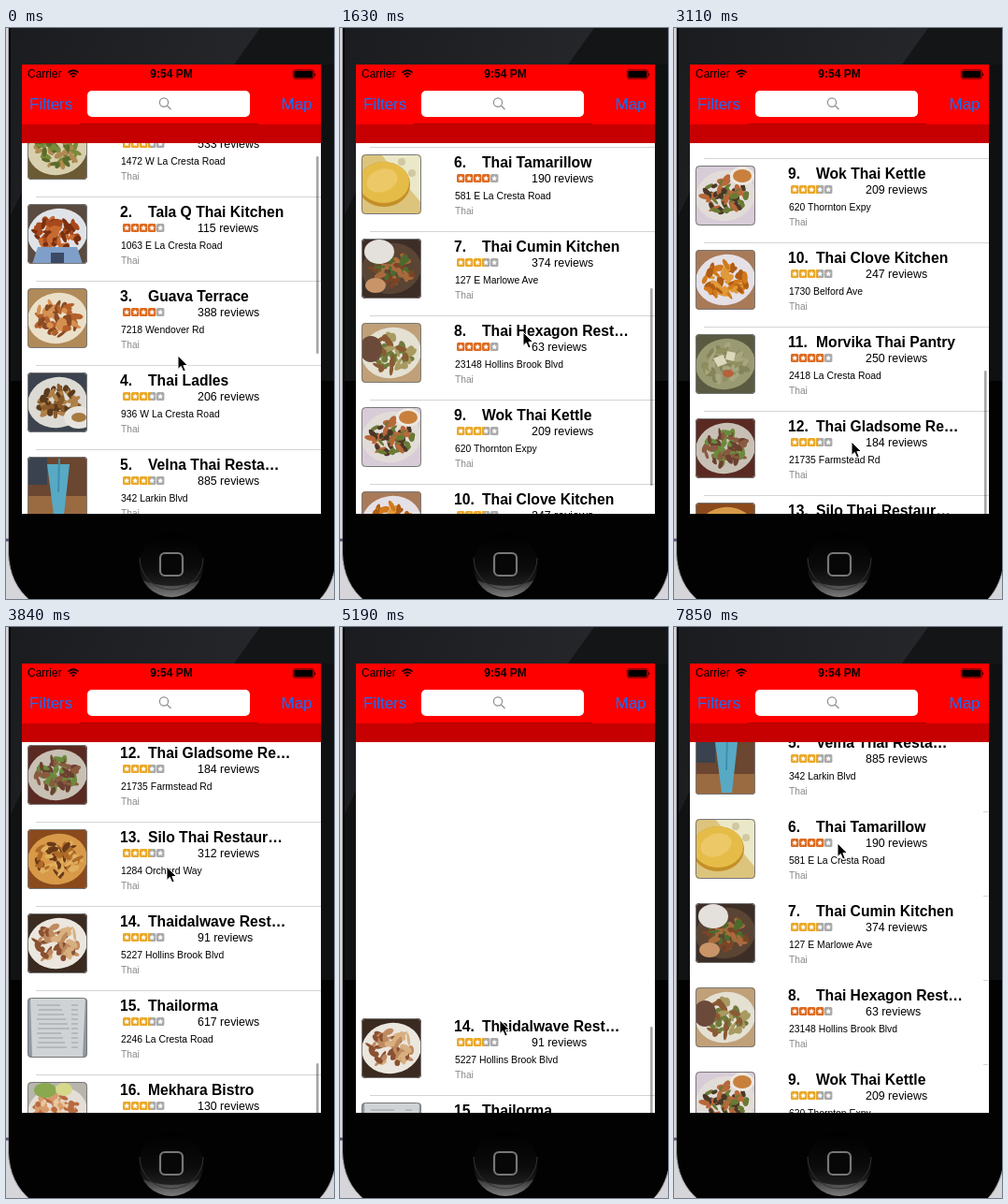
Recreate the animation shown at these times as an HTML page. Size 351 by 610 pixels, loop 7990 ms.

```html
<!DOCTYPE html>
<html lang="en">
<head>
<meta charset="utf-8">
<title>Restaurant list</title>
<style>
  html, body { margin: 0; width: 100%; height: 100%; overflow: hidden; background: #000; }
  svg { display: block; font-family: "Liberation Sans", Arial, sans-serif; }
  .title { font-size: 15.7px; font-weight: bold; }
  .count { font-size: 12.4px; }
  .addr { font-size: 10.4px; }
  .kind { font-size: 10.2px; fill: #8a8a8a; }
  .link { font-size: 17px; fill: #1670f5; }
  .status { font-size: 12px; }
</style>
</head>
<body>
<svg width="351" height="610" viewBox="0 0 351 610">
  <defs>
    <clipPath id="view"><rect x="17" y="123" width="320" height="396"/></clipPath>
    <clipPath id="round"><rect x="23" y="-8" width="64" height="64" rx="4"/></clipPath>
    <clipPath id="button"><circle cx="177" cy="573.500" r="34.500"/></clipPath>
    <linearGradient id="gloss" x2="1" y2="0.250">
      <stop offset="0" stop-color="#1b1c1f"/><stop offset="1" stop-color="#292a2e"/>
    </linearGradient>
    <linearGradient id="dome" x2="0" y2="1">
      <stop offset="0" stop-color="#000"/><stop offset="0.550" stop-color="#0b0b0b"/><stop offset="1" stop-color="#2c2c2c"/>
    </linearGradient>
    <linearGradient id="rim" x2="0" y2="1">
      <stop offset="0" stop-color="#2c2c2c"/><stop offset="1" stop-color="#858585"/>
    </linearGradient>
    <g id="star">
      <rect width="8.400" height="9" rx="1.500"/>
      <path d="M4.200 1.600l.9 1.900 2 .3-1.500 1.400.4 2.100-1.800-1-1.800 1 .4-2.100L1.300 3.800l2-.3z" fill="#fff"/>
    </g>
  </defs>

  <g id="phone">
    <rect width="351" height="610" fill="#d6d6da"/>
    <path d="M2.500 -5V560C3 584 12 600 26 612H334C343 604 349 592 352 578V-5Z" fill="#020202" stroke="#a4a4aa"/>
    <path d="M0 547h3" stroke="#55506a" stroke-width="3"/>
    <path d="M5 0H351V39H17V377H5Z" fill="url(#gloss)"/>
    <path d="M272 0H351V39H244Z" fill="#141517"/>
    <path d="M5 200L17 175V377H5Z" fill="#111214"/>
    <path d="M337 39H351V377H337Z" fill="#0f1012"/>
    <circle cx="177" cy="573.500" r="34.500" fill="url(#dome)"/>
    <path d="M142 588Q177 604 212 588V610H142Z" fill="url(#rim)" clip-path="url(#button)"/>
    <path d="M143 566A34 34 0 0 0 211 566" fill="none" stroke="#333"/>
    <rect x="165" y="561" width="24" height="24" rx="5" fill="#070707" stroke="#777" stroke-width="2.200"/>
  </g>

  <rect x="17" y="123" width="320" height="396" fill="#fff"/>
  <g clip-path="url(#view)">
    <g id="list"></g>
    <rect id="bar" x="332" width="2.600" height="211" rx="1.300" fill="#000" fill-opacity="0.350"/>
  </g>

  <rect x="17" y="39" width="320" height="64" fill="#f00"/>
  <rect x="17" y="103" width="320" height="20" fill="#c60000"/>
  <path d="M79 102.500H270" stroke="#b00000"/>
  <text class="status" x="23" y="53">Carrier</text>
  <g fill="none" stroke="#000" stroke-width="1.700">
    <path d="M66.500 47.700Q72 42.800 77.500 47.700M68.600 49.900Q72 46.900 75.400 49.900"/>
    <path d="M72 53L70.600 51.500Q72 50.500 73.400 51.500Z" fill="#000" stroke-width="0.800"/>
  </g>
  <text class="status" x="177" y="53" text-anchor="middle" font-weight="bold">9:54 PM</text>
  <rect x="307.300" y="44.800" width="22" height="9.400" rx="1.800" fill="none" stroke="#000" stroke-width="0.600"/>
  <rect x="308.300" y="45.800" width="20" height="7.400" rx="1"/>
  <path d="M330.300 47.500q1.800 2 0 4z"/>
  <text class="link" x="25" y="87">Filters</text>
  <text class="link" x="294.500" y="87">Map</text>
  <rect x="87" y="67" width="174" height="28" rx="5" fill="#fff"/>
  <g fill="none" stroke="#8e8e93" stroke-width="1.200">
    <circle cx="169" cy="79.500" r="4.600"/><path d="M172.400 83L176.500 87"/>
  </g>
  <path id="cursor" d="M0 0V14.500L3.300 11.400L5.700 17L8.200 16L5.900 10.500H10.500Z" stroke="#fff"/>
</svg>
<script>
const $ = id => document.getElementById(id);
const PITCH = 90, FIRST = 106, LOOP = 7990, STEPS = 54;

// name, reviews, street, full stars
const rows = [
  ['Lotus Nook Thai', 533, '1472 W La Cresta Road', 3],
  ['Tala Q Thai Kitchen', 115, '1063 E La Cresta Road', 4],
  ['Guava Terrace', 388, '7218 Wendover Rd', 4],
  ['Thai Ladles', 206, '936 W La Cresta Road', 3],
  ['Velna Thai Resta…', 885, '342 Larkin Blvd', 3],
  ['Thai Tamarillow', 190, '581 E La Cresta Road', 4],
  ['Thai Cumin Kitchen', 374, '127 E Marlowe Ave', 3],
  ['Thai Hexagon Rest…', 63, '23148 Hollins Brook Blvd', 4],
  ['Wok Thai Kettle', 209, '620 Thornton Expy', 3],
  ['Thai Clove Kitchen', 247, '1730 Belford Ave', 3],
  ['Morvika Thai Pantry', 250, '2418 La Cresta Road', 4],
  ['Thai Gladsome Re…', 184, '21735 Farmstead Rd', 3],
  ['Silo Thai Restaur…', 312, '1284 Orchard Way', 3],
  ['Thaidalwave Rest…', 91, '5227 Hollins Brook Blvd', 3],
  ['Thailorma', 617, '2246 La Cresta Road', 3],
  ['Mekhara Bistro', 130, '640 N Dunstorff Ave', 3],
  ['Oluvin Thai Kitchen', 809, '251 Alder St', 3],
  ['Nuvo Fine Thai Ki…', 726, '418 Quarry Ave', 4]
];

// backdrop, dish, then food tones
const dishes = [
  '#6b5a34 #d8cfae #7a8a3a #b08a50 #5a6a2a', '#5a4a40 #dfe3e8 #a8481c #c86a30 #7a3010',
  '#b08a58 #eadfc8 #b5602a #d59050 #8a4a24', '#3c434e #dcdad4 #8a5a2a #b08048 #5a3a1c',
  '#6b4630 #58a9c4', '#ddc47c #e6bc48',
  '#3c2e26 #5a4434 #7a4426 #4d6a2c #a86a3c', '#c0a078 #e4e0d2 #6d7a3a #a89a60 #8a5a34',
  '#d8ccd8 #e2dcd8 #4a3828 #b8683a #6a7a34', '#a87a58 #e5e0e6 #d27a1c #e09a38 #b05c14',
  '#5a5a42 #9a9a72 #8f8f60 #a8a680 #84845a', '#5a2a22 #c8c0b4 #8a5a40 #6a8a3c #6a4030',
  '#8a4a1c #d89a48 #b06a28 #6a3a18 #e0b060', '#3a2a20 #ebe6de #c08a60 #d8b080 #8a5030',
  '#8e98a2 #cfd3d6', '#b8b4ae #e4ded6 #d89a6a #e8c8a0 #b86a40',
  '#a08870 #8a6a54 #3a2018 #5a3424 #2a1610', '#5a3020 #c8b0a0 #b04028 #4a7a30 #8a3020'
].map(s => s.split(' '));

const ellipse = (x, y, rx, ry, c, turn = 0) =>
  `<ellipse cx="${x}" cy="${y}" rx="${rx}" ry="${ry}" fill="${c}" transform="rotate(${turn} ${x} ${y})"/>`;
const shape = (d, c) => `<path d="${d}" fill="${c}"/>`;

function random(seed) {
  return () => (seed = seed * 16807 % 2147483647) / 2147483647;
}

// Flat details that set single dishes apart
const extras = {
  2: shape('M34 38H76L82 56H28Z', '#7f9fc8') + shape('M48 44h14v12H48Z', '#3c4a66'),
  4: ellipse(78, 40, 16, 12, '#e6e4de') + ellipse(78, 40, 8, 5, '#a87a40'),
  7: ellipse(42, 6, 16, 13, '#e4e0dc') + ellipse(38, 42, 11, 8, '#c89468'),
  8: ellipse(33, 20, 12, 14, '#6b4a3a'),
  9: ellipse(73, 3, 13, 10, '#eee8e0') + ellipse(73, 3, 10, 7, '#c8803c'),
  11: shape('M42 18l10-4 5 9-10 4zM57 10l9 2-2 9-9-2z', '#dcd8bc') + ellipse(58, 34, 6, 4, '#b8603a'),
  16: ellipse(42, 1, 12, 8, '#8aa850') + ellipse(62, 0, 9, 7, '#d6d88a'),
  17: ellipse(30, 4, 11, 11, '#d87428') + shape('M23 44L50 39 87 45V56H23Z', '#b4b4b4')
};

function photo(n) {
  const [bg, dish, ...foods] = dishes[n - 1];
  let out = `<rect x="23" y="-8" width="64" height="64" fill="${bg}"/>`;
  if (n === 5) {
    out += shape('M23 34H87V56H23Z', '#9a6a40') + shape('M23 -8H44V22H23Z', '#39424e')
      + shape('M44 0H68L62 54H51Z', dish) + shape('M56 -6H58L57 30H55Z', '#3f8fae');
  } else if (n === 6) {
    out += shape('M44 -8H87V44Z', '#eae8c8') + ellipse(66, 0, 4, 4, '#cfc8a0') + ellipse(77, 12, 4, 4, '#cfc8a0')
      + ellipse(47, 24, 28, 24, '#c48f28') + ellipse(47, 22, 27, 22, dish) + ellipse(45, 20, 17, 12, '#ecc866', -20);
  } else if (n === 15) {
    out += shape('M26 -8H85L82 56H28Z', dish);
    for (let y = 0; y < 50; y += 5)
      out += `<path d="M${33 + y % 3} ${y}H${58 + y * 7 % 11}M70 ${y}h7" stroke="#9a9ea2"/>`;
  } else {
    const rnd = random(n * 977 + 13);
    out += ellipse(55, 24, 32, 27, dish, -10);
    for (let i = 0; i < 60; i++) {
      const a = rnd() * 6.28, r = Math.sqrt(rnd());
      out += ellipse((55 + 23 * r * Math.cos(a)).toFixed(1), (24 + 18 * r * Math.sin(a)).toFixed(1),
        3 + rnd() * 4, 1.5 + rnd() * 2, foods[i % 3], rnd() * 180 | 0);
    }
  }
  return `<g clip-path="url(#round)">${out}${extras[n] || ''}</g>
    <rect x="23.500" y="-7.500" width="63" height="63" rx="4" fill="none" stroke="#777"/>`;
}

function stars(full) {
  const on = full === 4 ? '#dd6a20' : '#eaa828';
  let out = '';
  for (let i = 0; i < 5; i++) {
    const x = 125 + i * 9;
    out += `<use href="#star" x="${x}" y="13" fill="${i < full ? on : '#a9a9a9'}"/>`;
    if (full === 3 && i === 3) out += `<path d="M${x} 13h4v1.500h-2.500v6h2.500v1.500h-4z" fill="${on}"/>`;
  }
  return out;
}

$('list').innerHTML = rows.map(([name, count, street, full], i) => `<g>
  <path class="rule" d="M32 -15.500H337" stroke="#d4d4d6"/>
  ${photo(i + 1)}
  <text class="title" x="122" y="5.500">${i + 1}.</text><text class="title" x="152" y="5.500">${name}</text>
  ${stars(full)}
  <text class="count" x="205" y="22">${count} reviews</text>
  <text class="addr" x="123" y="40">${street}</text>
  <text class="kind" x="123" y="56">Thai</text></g>`).join('');
const cells = [...$('list').children];
const rules = [...document.querySelectorAll('.rule')];

// step, value...
const scroll = [[0, 0], [1, 30], [3, 120], [6, 231], [8, 262], [9, 280], [12, 480], [15, 568], [18, 604],
  [20, 640], [21, 671], [24, 900], [27, 1085], [29, 1138], [31, 1149], [32, 1096], [35, 850], [37, 640],
  [39, 428], [43, 366], [47, 345], [48, 343]];
const pointer = [[0, 184, 350], [4, 198, 247], [6, 198, 247], [9, 195, 430], [12, 197, 272], [15, 197, 272],
  [19, 190, 455], [21, 190, 442], [25, 172, 256], [31, 169, 256], [35, 171, 420], [39, 171, 400],
  [43, 171, 297], [47, 172, 270], [50, 172, 260], [51, 172, 260], [53, 175, 231]];
const fade = [[0, 1], [29, 1], [31, 0], [33, 1], [47, 1], [49, 0]];

function at(track, k, col = 1) {
  const i = track.findIndex(p => p[0] > k);
  if (i < 0) return track[track.length - 1][col];
  const a = track[i - 1], b = track[i];
  return a[col] + (b[col] - a[col]) * (k - a[0]) / (b[0] - a[0]);
}

// Scrolling back reveals empty space until the cells reload
function firstRow(k) {
  return k < 32 || k >= 48 ? 0 : k < 39 ? 13 : rows.length;
}

function draw(t) {
  const k = Math.min(STEPS - 1, Math.floor((t + 6) / LOOP * STEPS));
  const s = Math.round(at(scroll, k)), first = firstRow(k);
  const loaded = k >= 48, bare = k >= 14 && k <= 16;
  cells.forEach((cell, i) => {
    const y = FIRST + i * PITCH - s;
    cell.style.display = i >= first && y > 40 && y < 540 ? '' : 'none';
    cell.setAttribute('transform', `translate(0 ${y})`);
    rules[i].setAttribute('d', loaded ? 'M331 -15.500H336' : 'M32 -15.500H337');
    rules[i].style.display = bare || (first && i === first) ? 'none' : '';
  });
  $('bar').setAttribute('y', 137 + Math.round(s * 0.3415));
  $('bar').setAttribute('opacity', at(fade, k));
  $('cursor').setAttribute('transform',
    `translate(${Math.round(at(pointer, k))} ${Math.round(at(pointer, k, 2))})`);
}

const start = performance.now();
function tick() {
  draw((performance.now() - start) % LOOP);
  requestAnimationFrame(tick);
}
tick();
</script>
</body>
</html>
```
